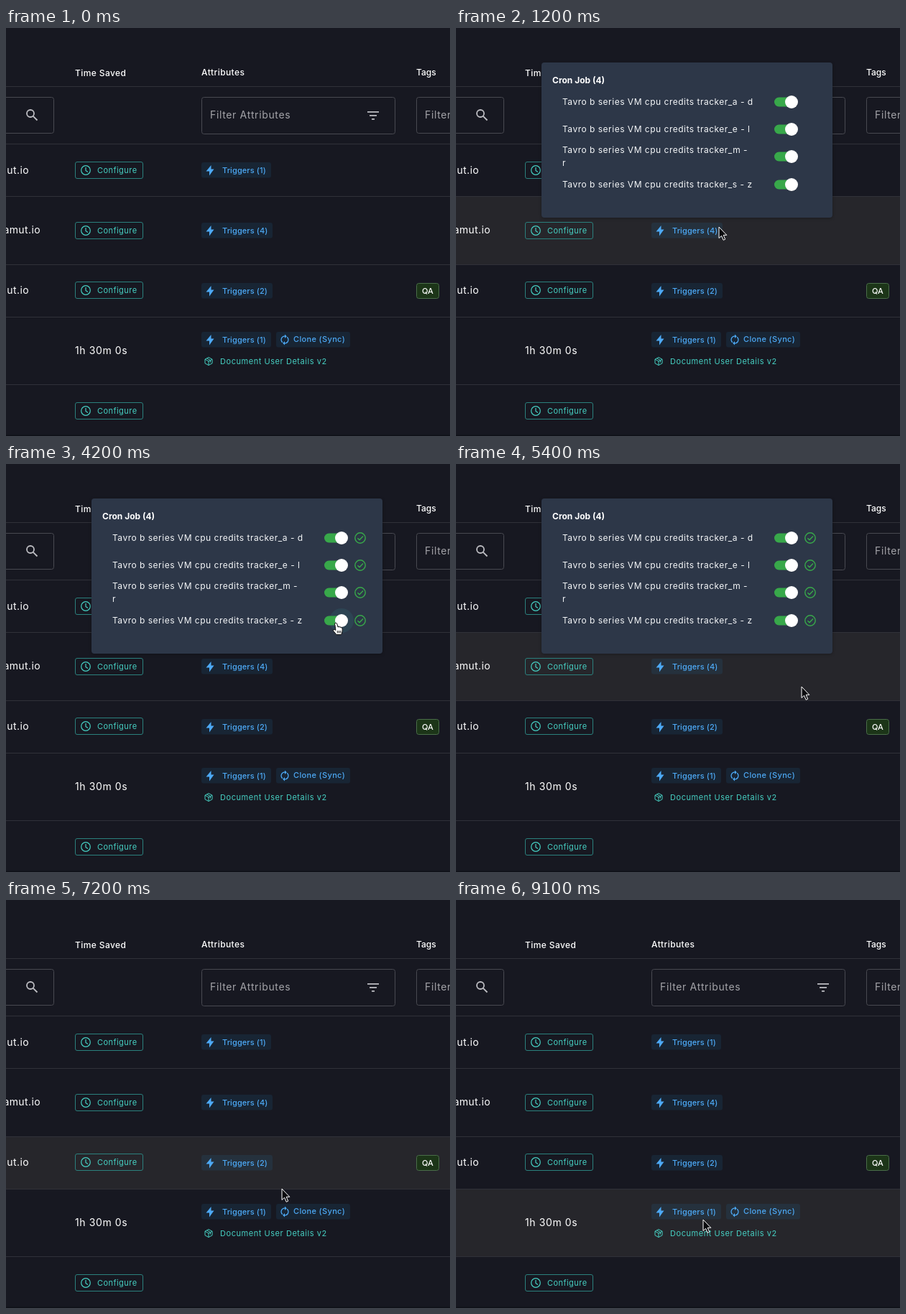
Write an HTML page with a canvas that moves like this. It is 618 by 568 pixels and loops after 9.2 s.

```html
<!DOCTYPE html>
<html lang="en">
<head>
<meta charset="utf-8">
<title>Workflow table</title>
<style>
  html, body { margin: 0; width: 100%; height: 100%; overflow: hidden; background: #171821; }
  canvas { display: block; width: 618px; height: 568px; }
</style>
</head>
<body>
<canvas id="stage"></canvas>
<script>
const W = 618, H = 568, LOOP = 9200, STEP = 100;
const canvas = document.getElementById('stage');
const ratio = window.devicePixelRatio || 1;
canvas.width = W * ratio;
canvas.height = H * ratio;
const ctx = canvas.getContext('2d');
ctx.scale(ratio, ratio);

const TEAL = '#46cfc2', BLUE = '#4da9f5', GREEN = '#38a84a', LINE = '#303139';
const ROWS = [161.5, 234.5, 329.5, 402.5, 496.5, 566.5];
const POPUP = { from: 1100, to: 5600, checks: 1500 };

// Pointer tip: time, x, y
const PATH = [
  [150, 412, 562], [500, 392, 400], [900, 366, 281], [1200, 366, 277],
  [1700, 415, 240], [2200, 452, 214], [2900, 441, 228], [3500, 456, 222],
  [4500, 460, 222], [5000, 470, 240], [5400, 481, 310], [5800, 410, 352],
  [6100, 372, 363], [6800, 375, 372], [7200, 384, 402], [7800, 362, 436],
  [8400, 346, 444], [9100, 344, 445]
];

function pointerAt(t) {
  if (t < PATH[0][0]) return null;
  const next = PATH.findIndex(p => p[0] > t);
  if (next < 0) return PATH[PATH.length - 1].slice(1);
  const [t0, x0, y0] = PATH[next - 1], [t1, x1, y1] = PATH[next];
  const u = (t - t0) / (t1 - t0), k = u * u * (3 - 2 * u);
  return [x0 + (x1 - x0) * k, y0 + (y1 - y0) * k];
}

function text(s, x, y, size, color, { weight = 400, gap = 0, align = 'left' } = {}) {
  ctx.font = `${weight} ${size}px Inter, "Open Sans", sans-serif`;
  ctx.letterSpacing = gap + 'px';
  ctx.textAlign = align;
  ctx.fillStyle = color;
  ctx.fillText(s, x, y);
}

function box(x, y, w, h, r, fill, stroke) {
  ctx.beginPath();
  ctx.roundRect(x, y, w, h, r);
  if (fill) { ctx.fillStyle = fill; ctx.fill(); }
  if (stroke) { ctx.strokeStyle = stroke; ctx.lineWidth = 1; ctx.stroke(); }
}

function disc(x, y, r, color) {
  ctx.beginPath();
  ctx.arc(x, y, r, 0, 7);
  ctx.fillStyle = color;
  ctx.fill();
}

function strokePath(d, x, y, color, width) {
  ctx.save();
  ctx.translate(x, y);
  ctx.strokeStyle = color;
  ctx.lineWidth = width;
  ctx.lineJoin = 'round';
  ctx.stroke(new Path2D(d));
  ctx.restore();
}

function fillPath(d, x, y, color) {
  ctx.save();
  ctx.translate(x, y);
  ctx.fillStyle = color;
  ctx.fill(new Path2D(d));
  ctx.restore();
}

function rule(y) {
  ctx.fillStyle = LINE;
  ctx.fillRect(0, y - 0.5, W, 1);
}

function configure(y) {
  box(96.5, y - 11.5, 94, 23, 2.5, null, '#2b807d');
  strokePath('M6.3 0A6.3 6.3 0 1 1-6.3 0A6.3 6.3 0 1 1 6.3 0M0-4V.5L3 2.4', 111, y, TEAL, 1.2);
  text('Configure', 127, y + 4, 11, TEAL, { gap: 0.45 });
}

function chip(x, y, w) {
  box(x, y, w, 21.5, 3, 'rgba(30,150,210,.1)');
}

function triggers(count, y) {
  chip(272, y - 11, count === 1 ? 97 : 99);
  fillPath('M1.5-7L-5.5 1.5H-1V7.5L5.5-1.5H1.5Z', 284, y, BLUE);
  text(`Triggers (${count})`, 301, y + 4, 11, BLUE, { weight: 500, gap: 0.1 });
}

function cloneChip() {
  chip(376, 423, 103);
  strokePath('M-3.2 3.8A5 5 0 0 1-1-4.9H1M3.2-3.8A5 5 0 0 1 1 4.9H-1', 388, 434, BLUE, 1.2);
  fillPath('M0-7.5V-2L2.8-4.8ZM0 7.5V2L-2.8 4.8Z', 388, 434, BLUE);
  text('Clone (Sync)', 400, 437, 11, BLUE, { weight: 500, gap: 0.35 });
}

function header() {
  const head = { weight: 500, gap: 0.4 };
  text('Time Saved', 96, 67, 12, '#fff', head);
  text('Attributes', 272, 66, 12, '#fff', head);
  text('Tags', 571, 66, 12, '#fff', { weight: 500 });
  rule(81.5);
  box(-20.5, 96.5, 87, 50, 3, null, '#484951');
  box(272.5, 96.5, 269, 51, 3, null, '#484951');
  box(571.5, 96.5, 100, 50, 3, null, '#484951');
  text('Filter Attributes', 284, 126, 14, '#a3a3a8', { gap: 0.65 });
  text('Filter Tags', 583, 126, 14, '#a3a3a8', { gap: 0.65 });
  strokePath('M5 0A5 5 0 1 1-5 0A5 5 0 1 1 5 0M3.6 3.6L9.5 9.5', 34, 119, '#bdbdc2', 1.8);
  strokePath('M-8-5H8M-5 0H5M-2 5H2', 511, 121.8, '#bdbdc2', 1.8);
}

function table(hovered) {
  if (hovered >= 0) {
    ctx.fillStyle = '#26262b';
    ctx.fillRect(0, ROWS[hovered], W, ROWS[hovered + 1] - ROWS[hovered]);
  }
  ROWS.slice(0, 5).forEach(rule);
  ctx.fillStyle = '#0f1017';
  ctx.fillRect(0, 566.5, W, 1.5);

  const mail = { gap: 0.4, align: 'right' };
  text('amut.io', 32, 203, 14, '#fff', mail);
  text('amut.io', 48, 286, 14, '#fff', mail);
  text('amut.io', 32, 370, 14, '#fff', mail);
  [198, 282, 365, 533].forEach(configure);
  text('1h 30m 0s', 96, 454, 14, '#fff', { gap: 0.6 });

  triggers(1, 198);
  triggers(4, 282);
  triggers(2, 366);
  triggers(1, 434);
  cloneChip();
  strokePath('M0-5.5L5-2.8V2.8L0 5.5L-5 2.8V-2.8ZM-5-2.8L0 0L5-2.8M0 0V5.5M-2.5-4.2L2.5-1.4V1.5', 282, 464, TEAL, 1);
  text('Document User Details v2', 298, 468, 11, TEAL, { gap: 0.55 });
  box(571.5, 355.5, 31, 21, 3, '#1c3518', '#4a6d49');
  text('QA', 579, 370, 11, '#fff', { weight: 500 });
}

function toggle(y, glow, checked) {
  if (glow) disc(467, y, 17, '#2d4453');
  box(443, y - 6.5, 30, 13, 6.5, GREEN);
  disc(467, y + 0.5, 9.2, 'rgba(0,0,0,.15)');
  disc(467, y, 9, '#fff');
  if (checked) {
    strokePath('M7.2 0A7.2 7.2 0 1 1-7.2 0A7.2 7.2 0 1 1 7.2 0M-3.6.2L-1 2.8L4-2.6', 493, y, '#38a84a', 1.4);
  }
}

function popup(t, tip) {
  ctx.save();
  ctx.shadowColor = 'rgba(0,0,0,.3)';
  ctx.shadowBlur = 4;
  ctx.shadowOffsetY = 1;
  box(119, 48, 405, 216, 4, '#2d3748');
  ctx.restore();
  text('Cron Job (4)', 134, 77, 12, '#fff', { weight: 700 });
  const label = (s, y) => text(s, 148, y, 12, '#f4f6f8', { gap: 0.5 });
  const job = 'Tavro b series VM cpu credits tracker_';
  label(job + 'a - d', 107);
  label(job + 'e - l', 145);
  label(job + 'm -', 174);
  label('r', 192);
  label(job + 's - z', 222);
  [103, 141, 179, 218].forEach(y =>
    toggle(y, overSwitch(tip) && Math.abs(tip[1] - y) < 19, t >= POPUP.checks));
}

function overSwitch([x, y]) {
  return x > 436 && x < 486 && y > 84 && y < 237;
}

function pointer([x, y], hand) {
  ctx.save();
  ctx.translate(x, y);
  const shape = new Path2D(hand
    ? 'M-1.6 0Q0-1.6 1.4 0L3 5L4.6 4.6L6.2 5.2L7.6 5.4L9 7V11L7.6 15.5H.8L-3.8 10Q-4.2 8-2 8.6L-.2 9.4Z'
    : 'M0 0V15.5L3.6 12.3L6.2 18.3L8.7 17.1L6.2 11.3H10.8Z');
  ctx.lineJoin = 'round';
  ctx.lineWidth = 1;
  ctx.fillStyle = hand ? '#fff' : '#0b0b0e';
  ctx.strokeStyle = hand ? '#111' : '#fff';
  ctx.fill(shape);
  ctx.stroke(shape);
  if (hand) ctx.stroke(new Path2D('M2.2 10V13.5M4.4 10V13.5M6.6 10V13.5'));
  ctx.restore();
}

function draw(t) {
  const tip = pointerAt(t);
  const open = t >= POPUP.from && t < POPUP.to;
  const inPopup = open && tip[1] < 264;
  const hovered = tip && !inPopup
    ? ROWS.findIndex((y, i) => tip[1] >= y && tip[1] < ROWS[i + 1]) : -1;

  ctx.fillStyle = '#171821';
  ctx.fillRect(0, 0, W, H);
  header();
  table(hovered);
  if (open) popup(t, tip);
  if (tip) pointer(tip, inPopup && overSwitch(tip));
}

function frame() {
  const t = performance.now() % LOOP;
  draw(Math.floor(t / STEP) * STEP);
  requestAnimationFrame(frame);
}
frame();
</script>
</body>
</html>
```
